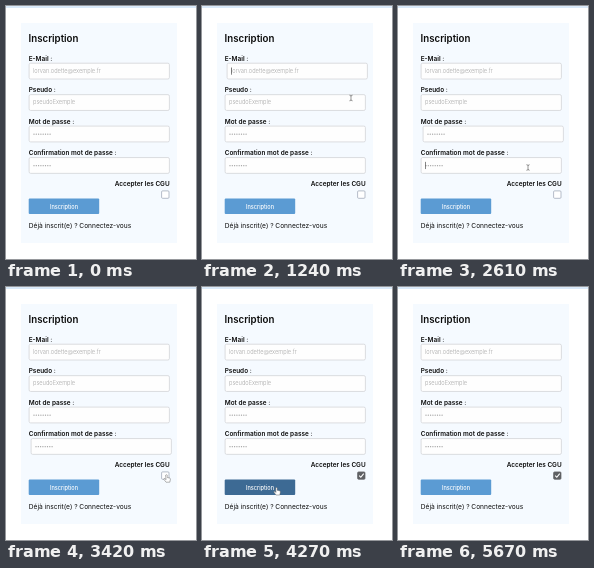
Animation, 190 px wide and 253 px high, one loop 5880 ms. Source, as an HTML page:

```html
<!DOCTYPE html>
<html lang="fr">
<head>
<meta charset="utf-8">
<title>Inscription</title>
<style>
html, body { margin: 0; width: 100%; height: 100%; overflow: hidden; background: #fff; }
svg { display: block; width: 100vw; height: 100vh; font-family: Inter, "Open Sans", sans-serif; }
text { fill: #0c0c0c; }
.label { font-size: 6.45px; font-weight: 600; }
.hint { font-size: 5.65px; font-weight: 300; fill: #a6a6a6; }
.box { fill: #fefefe; stroke: #d3d5d8; stroke-width: .8; }
</style>
</head>
<body>
<svg viewBox="0 0 190 253">
  <rect width="190" height="253" fill="#fff"/>
  <rect width="190" height="2" fill="#d9e9f9"/>
  <rect x="15" y="17" width="156" height="220" fill="#f5faff"/>
  <text x="22.6" y="35.8" font-size="9.7" font-weight="600">Inscription</text>
  <g id="fields"></g>
  <text class="label" x="163.7" y="180.4" text-anchor="end">Accepter les CGU</text>
  <rect id="check" x="155.6" y="184.9" width="7.4" height="7.4" rx="1" stroke-width=".7"/>
  <path id="tick" d="M157.2 188.7l1.6 1.6 2.9-3.6" fill="none" stroke="#fff" stroke-width="1.1"/>
  <rect id="button" x="22.7" y="192.5" width="70.5" height="15.6" rx="1"/>
  <text x="58" y="202.7" font-size="5.55" font-weight="500" text-anchor="middle" style="fill:#fff">Inscription</text>
  <text x="22.8" y="221.6" font-size="6.63">Déjà inscrit(e) ?</text>
  <text id="link" x="73.3" y="221.6" font-size="6.63">Connectez-vous</text>
  <g id="cursor" stroke-linejoin="round" stroke-linecap="round">
    <path id="arrow" d="M0 0v6.6l1.6-1.5 1.1 2.5 1.1-.5-1.1-2.4h2.1z" fill="#222" stroke="#fff" stroke-width=".5"/>
    <path id="beam" d="M-1.2-2.8q1.2 0 1.2.8v4q0 .8-1.2.8M1.2-2.8q-1.2 0-1.2.8M0 2q0 .8 1.2.8" fill="none" stroke="#555" stroke-width=".6"/>
    <path id="hand" d="M-.7 0q.7-.8 1.4 0v2.5l2.3.5q1 .3.9 1.3l-.6 2.9h-3.8l-2.2-3q0-1 1-.6l1 .8z" fill="#fff" stroke="#555" stroke-width=".45"/>
  </g>
</svg>
<script>
const LOOP = 5880, CHECKED_AT = 3500, BLINK = 500;
const $ = id => document.getElementById(id);
const clamp = v => Math.max(0, Math.min(1, v));
const smooth = v => { v = clamp(v); return v * v * (3 - 2 * v); };

// focus and blur times per field
const fields = [
  { label: 'E-Mail :', hint: 'lorvan.odette@exemple.fr', on: 850, off: 1545 },
  { label: 'Pseudo :', hint: 'pseudoExemple', on: 1545, off: 2130 },
  { label: 'Mot de passe :', on: 2130, off: 2600 },
  { label: 'Confirmation mot de passe :', on: 2600, off: CHECKED_AT }
];

const dots = y => Array.from({ length: 8 }, (_, i) =>
  `<circle cx="${28 + i * 2.3}" cy="${y}" r=".65" fill="#a0a0a0"/>`).join('');

$('fields').innerHTML = fields.map(({ label, hint }, i) => {
  const y = 57.2 + i * 31.45;
  const content = hint ? `<text class="hint" x="27" y="${y + 9.8}">${hint}</text>` : dots(y + 8.1);
  return `<text class="label" x="22.7" y="${y - 2.6}">${label}</text>
    <g id="field${i}"><rect class="box" x="23.1" y="${y}" width="140.3" height="15.8" rx="1.5"/>
    ${content}<rect id="caret${i}" x="27" y="${y + 4.3}" width=".6" height="7.2" fill="#333"/></g>`;
}).join('');

// time, x, y
const path = [
  [280, 194, 51], [700, 151, 64], [910, 151, 65], [1240, 149, 92],
  [1450, 147, 97], [1560, 147, 97], [2030, 141, 130], [2150, 141, 130],
  [2560, 130, 161.5], [2720, 130, 161.5], [3090, 160, 195], [3290, 160.5, 188],
  [3540, 160.5, 188], [4010, 88, 202], [4270, 74.5, 200.8], [4620, 72, 201],
  [5040, 83.5, 220], [5250, 85, 220], [5670, 197, 203]
];

function cursorAt(t) {
  const i = path.findIndex(p => p[0] > t);
  if (i < 1) return [-20, -20];
  const [t0, x0, y0] = path[i - 1], [t1, x1, y1] = path[i];
  const k = smooth((t - t0) / (t1 - t0));
  return [x0 + (x1 - x0) * k, y0 + (y1 - y0) * k];
}

const inside = ([x, y], left, top, right, bottom) =>
  x >= left && x <= right && y >= top && y <= bottom;
const show = (id, visible) => $(id).setAttribute('visibility', visible ? 'visible' : 'hidden');

function mix(a, b, k) {
  return `rgb(${a.map((v, i) => Math.round(v + (b[i] - v) * k))})`;
}

const overButton = t => inside(cursorAt(t), 22, 192, 93.5, 208.5);

// share of a short past window spent over the button
function buttonHover(t) {
  let hits = 0;
  for (let i = 0; i < 8; i++) hits += overButton(t - i * 25);
  return hits / 8;
}

function draw(t) {
  fields.forEach(({ on, off }, i) => {
    const shift = 2 * (smooth((t - on) / 220) - smooth((t - off) / 220));
    $('field' + i).setAttribute('transform', `translate(${shift} 0)`);
    show('caret' + i, t >= on && t < off && (t - on) % (2 * BLINK) < BLINK);
  });

  const checked = t >= CHECKED_AT;
  $('check').setAttribute('fill', checked ? '#5f6164' : '#fff');
  $('check').setAttribute('stroke', checked ? '#5f6164' : '#98a1b2');
  show('tick', checked);
  $('button').setAttribute('fill', mix([91, 155, 211], [61, 106, 148], buttonHover(t)));

  const pos = cursorAt(t);
  const onLink = inside(pos, 73, 214, 126, 224);
  const onField = fields.some((_, i) => inside(pos, 23, 57 + i * 31.45, 164, 73 + i * 31.45));
  const onHand = onLink || overButton(t) || inside(pos, 155, 184, 164, 193);
  $('link').setAttribute('font-weight', onLink ? 600 : 400);
  $('cursor').setAttribute('transform', `translate(${pos})`);
  show('beam', onField);
  show('hand', onHand);
  show('arrow', !onField && !onHand);
}

const start = performance.now();
function tick() {
  draw((performance.now() - start) % LOOP);
  requestAnimationFrame(tick);
}
tick();
</script>
</body>
</html>
```
